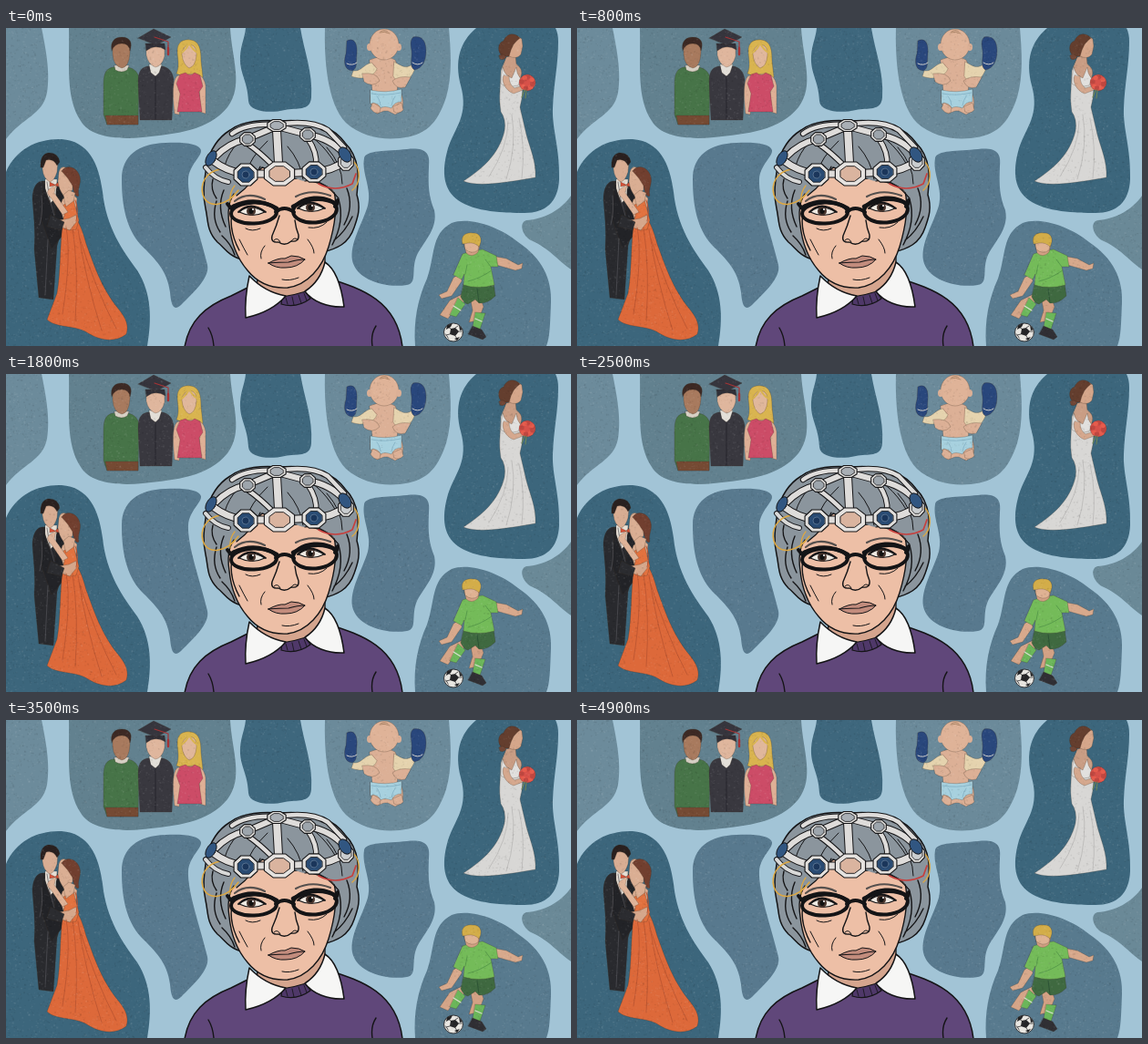
Recreate the animation shown at these times as an HTML page with a canvas. Size 620 px wide and 349 px high, loop 5000 ms.

```html
<!DOCTYPE html>
<html lang="en">
<head>
<meta charset="utf-8">
<title>Memories</title>
<style>
html, body { margin: 0; width: 100%; height: 100%; overflow: hidden; background: #a2c4d6; }
canvas { display: block; width: 620px; height: 349px; }
</style>
</head>
<body>
<canvas id="stage"></canvas>
<script>
const W = 620, H = 349, LOOP = 5000, STEP = 100;
const canvas = document.getElementById('stage');
const ratio = Math.max(1, window.devicePixelRatio || 1);
canvas.width = W * ratio;
canvas.height = H * ratio;
const ctx = canvas.getContext('2d');

const INK = '#141416', SKIN = '#dcb096', EDGE = 'rgba(60,45,35,.35)';

function random(seed) {
  return () => {
    seed = (seed * 1664525 + 1013904223) >>> 0;
    return seed / 4294967296;
  };
}

function shape(d, fill, line, width = 1) {
  const path = new Path2D(d);
  if (fill) { ctx.fillStyle = fill; ctx.fill(path); }
  if (line) { ctx.strokeStyle = line; ctx.lineWidth = width; ctx.stroke(path); }
}
const soft = (d, fill) => shape(d, fill, EDGE, .7);
const ink = (d, width = 1.4, color = INK) => shape(d, null, color, width);

function oval(x, y, rx, ry, fill, line, width = 1, turn = 0) {
  ctx.beginPath();
  ctx.ellipse(x, y, rx, ry, turn, 0, Math.PI * 2);
  if (fill) { ctx.fillStyle = fill; ctx.fill(); }
  if (line) { ctx.strokeStyle = line; ctx.lineWidth = width; ctx.stroke(); }
}

function octagon(x, y, rx, ry, fill, line = INK, width = 1.1) {
  ctx.beginPath();
  for (let i = 0; i < 8; i++) {
    const a = (i + .5) * Math.PI / 4;
    ctx.lineTo(x + rx * Math.cos(a), y + ry * Math.sin(a));
  }
  ctx.closePath();
  ctx.fillStyle = fill;
  ctx.fill();
  ctx.strokeStyle = line;
  ctx.lineWidth = width;
  ctx.stroke();
}

const BLOBS = [
  ['#6c8b9b', 'M0 0H39C43 20 49 48 45 71C40 96 18 98 0 122Z'],
  ['#62818f', 'M69 0C70 42 65 76 82 102C92 119 120 123 150 120C187 116 222 113 243 87C261 63 248 35 246 0Z'],
  ['#3e677d', 'M263 0H323C327 25 337 49 335 76C334 92 319 87 306 90C289 94 267 92 266 80C265 57 256 50 257 31C258 17 262 11 263 0Z'],
  ['#6b8a9a', 'M350 0C349 32 352 83 373 104C390 119 411 123 432 121C460 118 473 106 483 76C490 52 488 25 486 0Z'],
  ['#3c667c', 'M516 0C498 15 492 36 499 63C508 96 493 108 485 132C477 160 481 178 496 189C514 202 548 203 569 203C592 203 606 191 607 166C608 132 599 111 600 88C601 60 606 41 606 15Q606 6 603 0Z'],
  ['#3c667c', 'M0 158C11 132 36 121 61 122C90 124 102 148 106 180C110 219 128 244 144 266C160 291 160 320 155 349H0Z'],
  ['#58798e', 'M127 166C127 140 145 127 175 126C196 125 212 127 214 134C215 141 201 150 200 166C199 189 213 226 221 260C224 274 205 291 192 304C183 312 181 302 180 290C177 266 164 254 148 238C132 220 127 195 127 166Z'],
  ['#58798e', 'M393 143C394 134 418 135 440 133C459 131 466 136 464 152C463 174 464 185 470 200C474 220 460 232 451 249C444 265 452 280 440 282C416 286 384 276 380 255C377 236 391 215 397 195C402 176 390 160 393 143Z'],
  ['#587a8e', 'M449 349C447 321 452 297 462 275C471 250 466 226 489 214C509 207 541 218 562 235C589 253 599 276 598 301C597 325 597 339 593 349Z'],
  ['#6a8997', 'M620 184C609 200 590 210 571 211C562 214 567 228 576 233C597 242 605 255 620 265Z']
].map(([color, d]) => ({ color, d, path: new Path2D(d) }));

function graduates() {
  // green jumper
  soft('M117 43C108 45 107 53 107 63V95L111 106H145L146 54C143 46 139 44 133 43Z', '#477448');
  soft('M109 96H145V106H111Z', '#754a33');
  soft('M119 41H135L133 46Q127 50 120 46Z', '#d7d0c4');
  soft('M117 21Q117 13 127 13Q137 14 136 27Q135 43 127 44Q118 42 117 29Z', '#a87a5e');
  soft('M116 25C114 14 120 10 127 10C137 10 139 17 136 25Q135 17 127 17Q119 17 116 25Z', '#3c2924');
  // gown and cap
  soft('M155 42C147 44 145 49 145 60L147 101H182L184 56C182 47 179 44 172 42Z', '#39383f');
  soft('M157 40H171L168 49L164 53L159 49Z', '#e3dfd8');
  ink('M164 53V100', .8, '#222229');
  soft('M154 21Q164 16 174 21V31Q171 42 164 43Q156 40 154 30Z', '#dfb69d');
  soft('M153 17L174 17L175 24Q164 17 154 25Z', '#302f37');
  soft('M145 11L162 1L181 10L165 19Z', '#36353d');
  ink('M163 10L178 15V26', 1.2, '#a53335');
  ink('M178 22V29', 2.4, '#a53335');
  // pink dress
  soft('M188 25C188 15 195 12 202 13C213 14 214 25 214 36L216 54L205 58L187 50C191 41 188 33 188 25Z', '#d9b44f');
  soft('M189 52C182 55 183 75 185 94L190 95L193 68L212 68L213 92L219 94L219 63C217 53 213 51 207 50Z', '#dfb096');
  soft('M191 51L197 49Q202 54 207 49L213 52L216 64L212 70L215 92H188L191 72L187 61Z', '#cc4c67');
  soft('M193 26Q197 18 202 18Q210 20 209 30Q208 42 201 44Q194 40 193 29Z', '#e0b79b');
  ink('M193 27Q198 23 201 17Q205 24 210 27', 2, '#d9b44f');
}

function baby() {
  soft('M401 70C398 80 401 87 407 94L415 91L419 91L427 95L434 91C437 83 436 76 432 69Z', SKIN);
  soft('M399 35Q415 28 427 35L432 47L429 70Q414 74 402 69Z', SKIN);
  soft('M401 38C392 40 390 48 381 47L379 53C393 58 404 53 407 45Z', '#e5d3ae');
  soft('M426 37C435 42 438 45 446 40L449 44C443 61 431 64 425 53Z', '#e5d3ae');
  soft('M391 50Q407 48 410 58Q402 66 393 59Z', SKIN);
  soft('M444 54Q431 52 424 58Q428 68 438 65Z', SKIN);
  soft('M374 14C382 10 386 17 385 28C384 39 386 44 380 47C371 46 370 37 373 28Z', '#29477c');
  soft('M447 10C456 8 461 14 461 25C461 37 456 45 448 46C442 42 446 33 445 25C444 18 443 13 447 10Z', '#29477c');
  ink('M374 39Q380 42 385 38M446 38Q452 42 457 38', 1, '#d1d0cd');
  oval(415, 18, 16, 17, '#dfb398', EDGE, .7);
  oval(399, 21, 3, 4, SKIN);
  oval(431, 21, 3, 4, SKIN);
  ink('M411 4Q415 1 419 4M410 5Q415 3 421 6', .7, '#9b7657');
  soft('M400 68Q417 72 434 67L434 81Q426 81 423 88Q415 85 411 88Q408 81 400 83Z', '#a7d1df');
  ink('M401 72Q416 75 433 71M407 75Q410 78 411 85M427 75Q424 79 423 85', .7, '#7baabd');
  soft('M403 82L411 87L410 93Q404 95 400 88Z', SKIN);
  soft('M425 86L434 82L436 90Q431 95 426 92Z', SKIN);
}

function bride() {
  soft('M551 32Q546 37 543 47L542 69Q541 79 543 92Q549 100 547 113C541 139 522 155 502 168C518 175 552 169 581 164C582 147 575 132 571 117L564 87Q569 68 565 54L561 40Z', '#d8d7d5');
  soft('M549 32L559 29L560 40Q569 45 564 56L556 59Q546 54 545 43Z', '#c99d84');
  soft('M545 43Q543 51 543 61Q549 66 562 63L565 56Q560 50 560 43L555 55Q547 52 545 43Z', '#e1e0de');
  soft('M546 52C543 58 548 69 557 72L570 67L568 63L558 66Q552 62 552 53Z', '#d5a88e');
  soft('M552 11Q560 6 566 12L567 20L565 29Q560 35 552 31Z', '#d5a68a');
  soft('M564 11C558 4 549 6 546 14C539 16 539 27 545 31L552 31Q554 23 557 18Q560 14 564 11Z', '#643e2e');
  soft('M541 30Q546 27 549 32Q546 36 542 34Z', '#704636');
  oval(572, 60, 9, 9, '#d75149', EDGE, .7);
  for (let i = 0; i < 9; i++) {
    const a = i * 2.4;
    oval(572 + 6 * Math.cos(a), 60 + 6 * Math.sin(a), 2.6, 2.4, i % 2 ? '#e65c4c' : '#bf4740');
  }
  ink('M569 68L566 76M571 68L570 77', 1.1, '#6c8456');
  ink('M551 102Q551 131 530 163M563 99Q570 130 566 165M555 95Q561 129 549 166', .7, '#b4b2b0');
}

function couple() {
  soft('M39 168C32 169 29 178 29 188L31 213Q32 228 31 243L36 296L52 298L56 239L62 219L61 174L55 168Z', '#292a2e');
  soft('M43 166H56L55 186L49 192L43 177Z', '#e6ded4');
  soft('M41 168L46 188L54 205L55 177L59 171L64 182L62 228L50 242L39 211Z', '#222327');
  ink('M45 169L48 188L53 206M39 184Q41 202 37 216M46 232L43 293', .7, '#53545a');
  soft('M40 145Q49 140 57 147L56 158Q53 168 48 169Q41 165 40 155Z', '#d8ad93');
  soft('M38 153Q37 139 46 137Q57 136 59 147L56 151Q52 143 44 145L41 153Z', '#29201f');
  soft('M48 169L54 172L58 169V174L53 173L48 174Z', '#d35037');
  soft('M62 188C58 196 62 210 67 218L75 214L78 187L72 181Z', '#dbae92');
  soft('M62 217C59 240 60 269 56 291L45 320C54 329 73 326 87 333C102 343 119 346 132 336C135 327 132 319 124 309C104 285 96 258 88 237Q83 218 77 209L64 207Z', '#dd693a');
  soft('M63 194Q68 192 74 188L80 211L77 221Q67 224 61 217L64 206Z', '#e2723f');
  soft('M58 158Q60 151 66 153L74 161L73 178L63 184Q58 177 57 169Z', '#daae93');
  soft('M61 157C66 149 78 152 81 163C83 171 78 176 80 184C77 187 74 181 73 173Q68 164 61 157Z', '#713f2f');
  soft('M63 183L69 178L76 181L74 190L66 196Z', '#dbae92');
  soft('M47 177Q43 181 49 186L62 205L68 202L53 181L55 172Z', '#dfb398');
  soft('M57 211L69 209L77 205L78 212L70 222L59 218Z', '#d5a78b');
  soft('M49 205L64 213L61 222L45 218Z', '#2b2c30');
  ink('M66 219Q72 250 62 314M73 219Q80 265 76 321M79 221Q87 276 105 332M81 231Q98 286 121 330', .8, '#b85330');
  ink('M76 189Q80 199 77 212', 1, '#bd522f');
}

function player() {
  soft('M509 293L519 291L524 306L518 321L508 323L512 310Z', '#d3a184');
  soft('M501 292L508 294Q499 306 493 308L485 319L476 315L487 299Z', '#d5a588');
  soft('M496 296L504 303L494 317L487 315Z', '#6bb65a');
  soft('M515 312L526 313L520 331L512 329Z', '#6bb65a');
  ink('M491 305L499 310M515 319L522 322', 1.3, '#d7dfcf');
  soft('M512 327L522 331L527 339L523 342L507 336Z', '#302f34');
  soft('M502 281Q519 285 535 280L537 294Q528 303 519 302L515 298L507 303Q502 302 499 295Z', '#3f6940');
  ink('M517 286L519 301', .8, '#294e33');
  soft('M499 269L491 274L484 289L475 293L478 297L489 294L500 278Z', '#d8a98c');
  soft('M538 251L549 253L562 260L567 258L566 264L559 266L538 260Z', '#d8a98c');
  soft('M501 248Q511 244 523 243L538 250L540 262L532 262L536 282Q518 287 502 282L503 270L500 276L491 271Z', '#74bb59');
  ink('M504 270L506 260M532 262L526 254M507 278Q520 275 533 266', .7, '#4d8f45');
  soft('M503 238H520L518 246Q511 253 505 247Z', '#d2a083');
  soft('M502 230Q511 225 520 231L518 244Q511 249 504 243Z', '#dfb293');
  soft('M501 237C498 227 506 224 512 225C520 224 524 232 519 240Q514 235 507 236Z', '#d3ad49');
  oval(491, 334, 10.5, 10, '#e9e7e2', '#2b2b2d', .9);
  shape('M488 330L493 329L497 333L493 338L487 336ZM484 326L490 324L488 328L483 331ZM497 326L501 331L498 332ZM481 334L485 339L486 342ZM492 341L498 339L495 343Z', '#252527');
  ink('M488 330L485 328M493 329L496 327M497 333L500 333M493 338L495 341M487 336L483 337', .7);
}

function band(d, width = 6) {
  ink(d, width + 2);
  ink(d, width, '#dedcda');
}

function pad(x, y, rx, ry, fill) {
  octagon(x, y, rx, ry, '#e2e0dd');
  octagon(x, y, rx * .68, ry * .68, fill, INK, .8);
}

function headset() {
  ink('M244 169Q229 166 219 153', 6, '#1c1c20');
  ink('M244 169Q229 166 219 153', 4, '#d9d9d8');
  ink('M235 155C218 158 213 172 216 183C221 199 242 196 255 178', 1.5, '#dda842');
  ink('M251 173Q245 180 246 191', 1.2, '#dda842');
  ink('M343 171Q361 181 380 171L384 160', 1.7, '#c63f3d');
  ink('M381 146C390 155 389 171 380 178', 1.4, '#dda842');

  band('M229 142Q244 126 264 122L297 108L331 117Q356 121 372 139');
  band('M248 116Q264 104 297 106Q334 100 353 112L371 131', 4.5);
  band('M297 112L299 148', 8);
  band('M226 145Q243 158 262 160L300 160L339 158Q357 157 375 145', 7);
  band('M265 127Q278 136 292 150M331 121Q342 137 340 151', 4.5);

  pad(297, 107, 11, 7, '#a9afb5');
  pad(265, 122, 9, 8, '#9da5ac');
  pad(331, 117, 9, 8, '#9da5ac');
  pad(373, 147, 9, 10, '#cacdcf');
  pad(263, 161, 14, 13, '#294b73');
  pad(338, 158, 14, 12, '#294b73');
  octagon(300, 160, 18, 14, '#e5e2df');
  octagon(300, 160, 12, 9, '#dab49f', INK, .9);
  oval(263, 161, 4, 4, '#1b365b', '#7890a9', .6);
  oval(338, 158, 4, 4, '#1b365b', '#7890a9', .6);
  oval(225, 143, 5, 9, '#315681', INK, 1, .5);
  oval(372, 139, 6, 9, '#315681', INK, 1, -.6);
}

function woman() {
  shape('M196 350C201 321 219 305 247 294L269 283L352 274C389 286 429 298 435 350Z', '#60477a', INK, 1.5);
  ink('M222 329Q227 337 228 349M406 327Q400 336 402 349');
  shape('M275 258L276 285Q302 307 329 294L350 265V238Z', '#d5a58e', INK, 1.3);

  shape('M246 112C261 101 282 101 300 102C337 99 359 108 372 126C389 143 387 165 385 183C390 199 385 210 382 219C376 237 363 242 348 246L339 177L258 179L261 255C242 249 241 242 232 235C220 223 222 211 219 198C215 181 218 167 220 151C224 133 233 120 246 112Z', '#8b959d', INK, 1.5);
  shape('M257 177C246 181 242 197 245 216C247 236 253 252 265 266C277 281 292 286 309 285C331 282 347 263 354 240C361 217 364 197 360 179C349 169 335 170 326 164C311 169 297 157 281 153Q269 166 257 177Z', '#edbfa6', INK, 1.4);
  shape('M253 184C265 175 273 164 279 151C296 151 316 167 328 168C343 166 356 171 365 187C377 168 371 134 350 121C324 107 269 108 249 123C229 138 234 167 253 184Z', '#8b959d');
  ink('M253 184C265 175 274 165 279 152M328 168Q346 164 365 187', 1.2);
  ink('M239 178Q231 197 241 218M231 190Q225 209 235 224M237 228Q247 237 251 249M250 194Q242 218 256 244M374 176Q382 196 371 216M365 188Q372 212 358 238M380 207Q372 224 360 233M227 166Q224 177 231 187');
  ink('M278 114Q249 121 240 151M315 111Q342 116 362 150M287 124Q268 142 263 160M309 130Q323 146 326 166M352 131Q369 150 369 171', 1);

  headset();

  // brows and eyes
  ink('M251 190Q265 179 284 188M318 185Q335 176 356 184', 2.2, '#55504e');
  for (const [x, y] of [[270, 201], [335, 197]]) {
    shape(`M${x - 14} ${y + 1}Q${x - 3} ${y - 9} ${x + 14} ${y + 1}Q${x} ${y + 8} ${x - 14} ${y + 1}Z`, '#eee9e2', INK, 1.2);
    oval(x - 1, y, 5, 5, '#49362f');
    oval(x - 1, y, 2.6, 3, '#111');
    oval(x + 1, y - 2, 1, 1, '#fff');
    ink(`M${x - 15} ${y + 1}Q${x - 2} ${y - 12} ${x + 15} ${y + 1}`, 1.8);
  }
  oval(272, 203, 25, 11.5, null, INK, 4, -.04);
  oval(339, 200, 24, 13.5, null, INK, 4, -.08);
  ink('M296 202Q305 194 316 202M247 198L243 193M361 196L364 189', 4);
  ink('M249 196Q273 184 297 198M315 196Q340 181 363 193', 4.5);

  // nose, mouth and lines
  ink('M300 206Q297 217 292 228Q290 236 299 235Q306 240 313 234Q322 235 321 227Q318 220 317 211');
  ink('M294 233Q298 229 301 235M313 234Q316 229 320 232M284 239Q278 246 280 253M331 232Q338 241 338 247M263 220Q270 224 279 220M332 219Q344 221 352 213M256 232Q261 242 265 249M303 276Q311 278 321 274', 1);
  shape('M288 258Q299 252 306 253L313 250Q322 250 328 254Q320 263 307 263Q296 264 288 258Z', '#c28c7d', INK, 1);
  ink('M288 258Q302 257 310 257Q320 254 328 254', 1.2);

  shape('M303 295Q317 293 329 289L334 297Q319 308 302 303Z', '#4f3869', INK, 1.2);
  ink('M307 296L309 303M314 295L316 304M321 293L324 302M327 291L330 299', .8);
  shape('M267 272C264 286 262 303 263 318C281 314 296 307 307 294Q284 290 267 272Z', '#f6f6f5', INK, 1.5);
  shape('M350 257C361 264 368 283 371 306C353 307 336 300 328 289Q345 278 350 257Z', '#f6f6f5', INK, 1.5);
}

// A repeatable sheet of paper fibres
function paper() {
  const sheet = document.createElement('canvas');
  sheet.width = sheet.height = 256;
  const g = sheet.getContext('2d'), rnd = random(71);
  for (let i = 0; i < 6500; i++) {
    const shade = rnd() < .5 ? 255 : 15;
    g.fillStyle = `rgba(${shade},${shade},${shade},${.025 + rnd() * .055})`;
    g.fillRect(rnd() * 256, rnd() * 256, .6 + rnd() * 1.7, .6 + rnd() * 1.5);
  }
  return sheet;
}

function layer(draw) {
  const c = document.createElement('canvas');
  c.width = canvas.width;
  c.height = canvas.height;
  return { c, draw };
}

const grain = ctx.createPattern(paper(), 'repeat');
ctx.lineCap = ctx.lineJoin = 'round';

function render(step) {
  ctx.setTransform(ratio, 0, 0, ratio, 0, 0);
  ctx.fillStyle = '#a2c4d6';
  ctx.fillRect(0, 0, W, H);
  for (const b of BLOBS) {
    ctx.fillStyle = b.color;
    ctx.fill(b.path);
  }
  [graduates, baby, bride, couple, player].forEach(draw => draw());

  const rnd = random(step * 7919 + 13);
  rnd();
  grain.setTransform(new DOMMatrix().translate(Math.floor(rnd() * 256), Math.floor(rnd() * 256)));
  ctx.fillStyle = grain;
  for (const b of BLOBS) ctx.fill(b.path);
  woman();
}

let shown = -1;
const start = performance.now();
function tick(now) {
  const step = Math.floor((Math.max(0, now - start) % LOOP) / STEP);
  if (step !== shown) render(shown = step);
  requestAnimationFrame(tick);
}
render(shown = 0);
requestAnimationFrame(tick);
</script>
</body>
</html>
```
